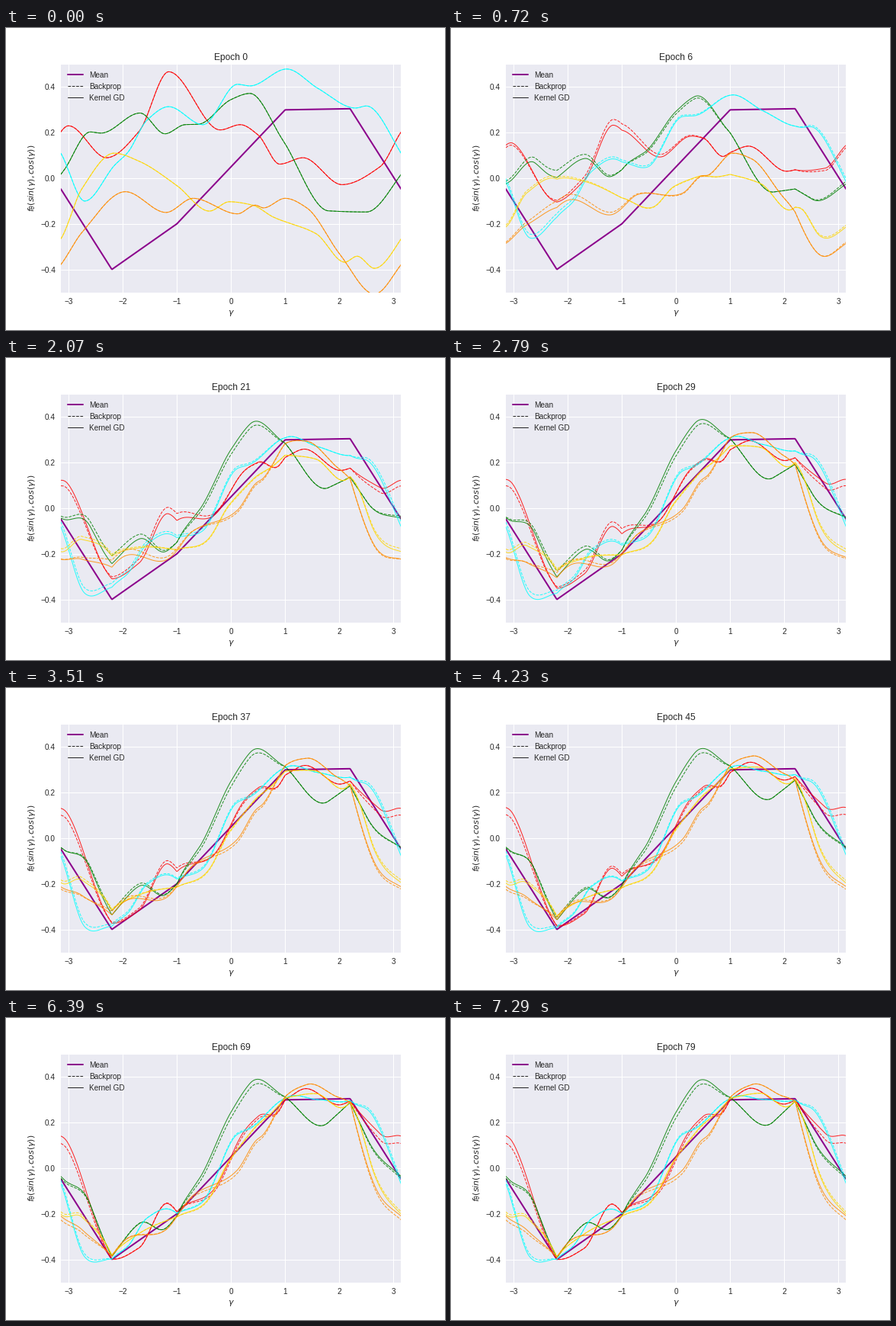
A matplotlib script for the animation above (7380 ms loop, 576 px wide and 396 px high).

```python
import numpy as np
import matplotlib.pyplot as plt
from matplotlib.animation import FuncAnimation
from matplotlib.lines import Line2D

FRAMES, INTERVAL, HOLD = 82, 90, 2
TURN = 2 * np.pi
THIN = dict(lw=1, alpha=0.85)

plt.style.use("seaborn-v0_8")
plt.rcParams.update({
    "font.family": "sans-serif",
    "font.sans-serif": ["Liberation Sans", "DejaVu Sans"],
    "figure.subplot.bottom": 0.125,
})

# Training points on the circle and their targets
KNOTS = np.array([-2.2, -1.0, 1.0, 2.2])
TARGETS = np.array([-0.4, -0.2, 0.3, 0.305])
RING = np.append(KNOTS, KNOTS[0] + TURN)
GAMMA = np.linspace(-np.pi, np.pi, 513)
UNWRAPPED = np.where(GAMMA < KNOTS[0], GAMMA + TURN, GAMMA)

# Kernel eigenmodes at the training points (two even, two odd) and decay per epoch
MODES = np.array([[1, 1, 1, 1], [-1, 1, 1, -1],
                  [1, 1.15, -1.15, -1], [1, -1.75, 1.75, -1]]).T
RATES = np.array([0.14, 0.04, 0.064, 0.036])


def smooth_loop(points, x):
    """Periodic monotone cubic through (x, y) key points."""
    px, py = np.transpose(points)
    px = np.concatenate([px[-2:] - TURN, px, px[:3] + TURN])
    py = np.concatenate([py[-2:], py, py[:3]])
    h = np.diff(px)
    d = np.diff(py) / h
    left, right = d[:-1], d[1:]
    product, total = left * right, left + right
    slope = np.zeros(len(px))
    rising = product > 0
    slope[1:-1][rising] = 2 * product[rising] / total[rising]
    k = np.searchsorted(px, x, side="right") - 1
    u = (x - px[k]) / h[k]
    step = u * u * (3 - 2 * u)
    return (py[k] + (py[k + 1] - py[k]) * step
            + h[k] * u * (1 - u) * (slope[k] * (1 - u) - slope[k + 1] * u))


def ring_linear(values):
    """Piecewise linear function through values at the training points."""
    return np.interp(UNWRAPPED, RING, np.append(values, values[0]))


def arch(start, end):
    """Unit parabola over one gap between training points, zero elsewhere."""
    u = np.clip((UNWRAPPED - start) / (end - start), 0, 1)
    return 4 * u * (1 - u)


MIDDLE, BACK = arch(*RING[1:3]), arch(*RING[3:5])


class Network:
    """One random initialisation, trained by kernel GD and by backprop.

    bow and drift are heights over the middle and back gaps;
    lag is the delay of backprop at the two left training points.
    """

    def __init__(self, ax, color, points, bow, drift, lag):
        self.start = smooth_loop(points, GAMMA)
        self.weights = np.linalg.solve(MODES, TARGETS - smooth_loop(points, KNOTS))
        self.bow = bow[0] * MIDDLE + bow[1] * BACK
        self.drift = drift[0] * MIDDLE + drift[1] * BACK
        self.lag = ring_linear([*lag, 0, 0])
        self.backprop, = ax.plot([], [], "--", color=color, **THIN)
        self.kernel, = ax.plot([], [], "-", color=color, **THIN)

    def show(self, epoch):
        growth = 1 - np.exp(-epoch / 10)
        delay = epoch / 13 * np.exp(1 - epoch / 13)
        change = MODES @ (self.weights * (1 - np.exp(-RATES * epoch)))
        kernel = self.start + ring_linear(change) + self.bow * growth
        self.kernel.set_data(GAMMA, kernel)
        self.backprop.set_data(GAMMA, kernel + self.drift * growth + self.lag * delay)


fig, ax = plt.subplots(figsize=(8, 5.5), dpi=72)
ax.plot(GAMMA, ring_linear(TARGETS), color="darkmagenta", lw=2)

networks = [
    Network(ax, "red",
            [(-3, .23), (-2.3, .09), (-1.7, .205), (-1.15, .467), (-.2, .212), (.17, .235),
             (.5, .19), (.9, .062), (1.33, .09), (2.05, -.028), (2.75, .05)],
            bow=(.03, .025), drift=(-.015, -.033), lag=(.01, .035)),
    Network(ax, "green",
            [(-3.1, .03), (-2.6, .203), (-2.4, .198), (-1.68, .286), (-1.22, .195),
             (-.85, .235), (-.6, .237), (0, .345), (.35, .372), (.95, .17), (1.8, -.143),
             (2.5, -.148)],
            bow=(.035, .03), drift=(-.025, -.01), lag=(.04, 0)),
    Network(ax, "cyan",
            [(-2.7, -.1), (-2.15, .057), (-1.9, .115), (-1.55, .255), (-1.15, .314),
             (-.52, .235), (.12, .412), (.35, .405), (1.03, .479), (1.6, .395), (2.3, .308),
             (2.5, .317), (3.14, .11)],
            bow=(.055, .05), drift=(.005, .015), lag=(.02, .01)),
    Network(ax, "gold",
            [(-3.14, -.265), (-2.75, -.045), (-2.16, .11), (-1.7, .075), (-1, -.032),
             (-.4, -.144), (-.03, -.103), (.4, -.118), (.78, -.17), (1.57, -.243),
             (2.1, -.368), (2.33, -.342), (2.65, -.395)],
            bow=(-.01, -.015), drift=(-.005, .01), lag=(.01, 0)),
    Network(ax, "darkorange",
            [(-3.14, -.378), (-2.75, -.237), (-1.95, -.059), (-1.2, -.15), (-.7, -.088),
             (.12, -.156), (.45, -.118), (.6, -.13), (1, -.088), (1.4, -.13), (2, -.33),
             (2.65, -.508)],
            bow=(-.04, -.025), drift=(-.015, -.018), lag=(.035, .01)),
]

ax.set_xlim(-np.pi, np.pi)
ax.set_ylim(-0.5, 0.5)
ax.set_xticks(range(-3, 4))
ax.set_yticks([-0.4, -0.2, 0, 0.2, 0.4])
ax.set_xlabel(r"$\gamma$")
ax.set_ylabel(r"$f_{\theta}(sin(\gamma),cos(\gamma))$")
ax.legend(handles=[
    Line2D([], [], color="darkmagenta", lw=2, label="Mean"),
    Line2D([], [], color="black", ls="--", label="Backprop", **THIN),
    Line2D([], [], color="black", label="Kernel GD", **THIN),
], loc="upper left")


def update(frame):
    epoch = max(0, frame - HOLD)
    ax.set_title(f"Epoch {epoch}")
    for network in networks:
        network.show(epoch)


anim = FuncAnimation(fig, update, frames=FRAMES, interval=INTERVAL, repeat=True, repeat_delay=0)
plt.show()
```
